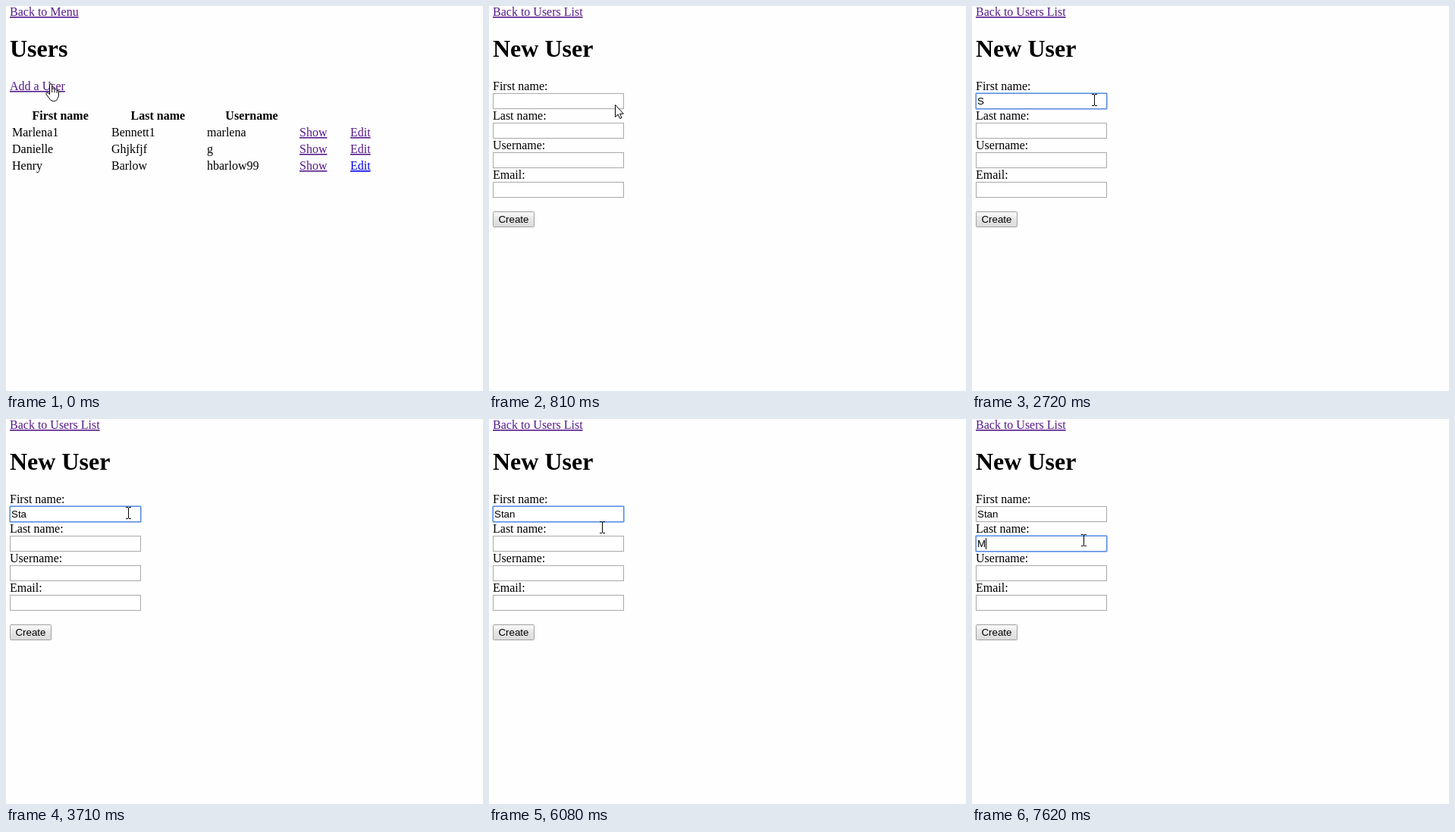
Animation, 629 px wide and 508 px high, one loop 8 s. Source, as an HTML page:

```html
<!DOCTYPE html>
<html lang="en">
<head>
<meta charset="utf-8">
<title>New User</title>
<style>
  html, body { margin: 0; width: 100%; height: 100%; overflow: hidden; background: #fefefe; }
  svg { display: block; width: 629px; height: 508px; }
  text { font: 16px "Liberation Serif", "Times New Roman", serif; white-space: pre; }
  .title { font-size: 32px; font-weight: bold; }
  .head text { font-weight: bold; text-anchor: middle; }
  .link { fill: #551a8b; text-decoration: underline; }
  .new { fill: #0000ee; }
  .ui { font: 13.333px "Liberation Sans", Arial, sans-serif; }
  .mid { text-anchor: middle; }
  .field { fill: #fff; stroke: #a9a9a9; }
  .glow { fill: none; stroke: #4d90fe; stroke-opacity: 0; }
  .focus .field { stroke: #5a8ad8; }
  .focus .glow { stroke-opacity: .55; }
  .outline { fill: #fff; stroke: #000; stroke-linejoin: round; }
  .fine { fill: none; stroke: #000; }
  [hidden] { display: none; }
</style>
</head>
<body>
<svg viewBox="0 0 629 508">
  <defs>
    <linearGradient id="face" x2="0" y2="1">
      <stop offset="0" stop-color="#f6f6f6"/>
      <stop offset=".3" stop-color="#f3f3f3"/>
      <stop offset=".3" stop-color="#ebebeb"/>
      <stop offset="1" stop-color="#dadada"/>
    </linearGradient>
  </defs>

  <g id="list">
    <text class="link" x="5" y="13">Back to Menu</text>
    <text class="title" x="5" y="67">Users</text>
    <text class="link" x="5" y="111">Add a User</text>
    <g class="head">
      <text x="71.7" y="150">First name</text>
      <text x="200.3" y="150">Last name</text>
      <text x="324" y="150">Username</text>
    </g>
    <g id="rows"></g>
  </g>

  <g id="form" hidden>
    <text class="link" x="5" y="13">Back to Users List</text>
    <text class="title" x="5" y="67">New User</text>
    <g id="fields"></g>
    <rect x="5.5" y="271.5" width="54" height="20" rx="1" fill="url(#face)" stroke="#a0a0a0"/>
    <text class="ui mid" x="32.5" y="286">Create</text>
    <rect id="caret" width="1" height="15"/>
  </g>

  <g id="cursor">
    <g id="hand">
      <path class="outline" d="M5.5 14.5V2.5Q5.5 .5 7 .5T8.7 2.5V7.7Q9.2 6.6 10.6 6.8 11.9 7 12 8.4 12.6 7.5 13.8 7.8 15 8.1 15.1 9.4 17.3 8.9 17.4 11.2V16Q17.4 18.4 15.6 20.6V21.5Q14 23.5 10.7 23.5 7.6 23.5 6.2 21.3L1.2 14.8Q.2 13 1.6 12.2 3 11.6 4.2 13Z"/>
      <path class="fine" d="M8.7 7.5V12M12 8.5V12.4M15.1 9.5V12.8"/>
    </g>
    <path id="arrow" class="outline" d="M.5 .5V16.4L4.2 13 6.6 18.5 9 17.5 6.7 12.2H11.4Z"/>
    <path id="beam" class="fine" d="M0 .5H3M4 .5H7M3.5 1V15M0 15.5H3M4 15.5H7"/>
  </g>
</svg>

<script>
const $ = id => document.getElementById(id);
const LOOP = 8000;

const users = [
  ["Marlena1", "Bennett1", "marlena"],
  ["Danielle", "Ghjkfjf", "g"],
  ["Henry", "Barlow", "hbarlow99"]
];
const columns = [8, 139, 265, 387, 454];

$("rows").innerHTML = users.map((user, row) =>
  [...user, "Show", "Edit"].map((label, col) => {
    const unseen = row === 2 && col === 4 ? " new" : "";
    const style = col > 2 ? ` class="link${unseen}"` : "";
    return `<text${style} x="${columns[col]}" y="${172 + 22 * row}">${label}</text>`;
  }).join("")
).join("");

$("fields").innerHTML = ["First name:", "Last name:", "Username:", "Email:"].map((label, i) => `
  <g transform="translate(0 ${39 * i})">
    <text x="5" y="111">${label}</text>
    <rect class="glow" x="4.5" y="114.5" width="174" height="22" rx="1.5"/>
    <rect class="field" x="5.5" y="115.5" width="172" height="20"/>
    <text class="ui value" x="7" y="130"></text>
  </g>`).join("");

const boxes = [...$("fields").children];
const values = boxes.map(box => box.querySelector(".value"));

// [start, shape, left, top]
const moves = [
  [0, "hand", 52, 102],
  [270, "beam", 63, 98],
  [420, "arrow", 120, 128],
  [540, "arrow", 204, 158],
  [660, "arrow", 202, 167],
  [810, "arrow", 166, 130],
  [930, "beam", 160, 119],
  [1060, "beam", 158, 116],
  [6080, "beam", 146, 135],
  [6230, "beam", 144, 148],
  [6380, "beam", 144, 152]
];

// [start, focused field, first name, last name, caret x (0 = hidden)]
const typing = [
  [0, -1, "", "", 0],
  [1210, 0, "", "", 7],
  [1770, 0, "", "", 0],
  [2190, 0, "S", "", 16],
  [2720, 0, "S", "", 0],
  [2870, 0, "St", "", 20],
  [3160, 0, "Sta", "", 27],
  [3710, 0, "Sta", "", 0],
  [4150, 0, "Sta", "", 27],
  [4700, 0, "Sta", "", 0],
  [5260, 0, "Stan", "", 34],
  [5790, 0, "Stan", "", 0],
  [6500, 1, "Stan", "", 7],
  [7040, 1, "Stan", "", 0],
  [7620, 1, "Stan", "M", 18]
];

const at = (steps, t) => steps.findLast(step => step[0] <= t);
const show = (node, on) => node.toggleAttribute("hidden", !on);

function draw(t) {
  show($("list"), t < 150);
  show($("form"), t >= 150);

  const [, shape, x, y] = at(moves, t);
  for (const node of $("cursor").children) show(node, node.id === shape);
  $("cursor").setAttribute("transform", `translate(${x} ${y})`);

  const [, focus, first, last, caret] = at(typing, t);
  boxes.forEach((box, i) => box.classList.toggle("focus", i === focus));
  values[0].textContent = first;
  values[1].textContent = last;
  show($("caret"), caret > 0);
  $("caret").setAttribute("x", caret);
  $("caret").setAttribute("y", 118 + 39 * Math.max(focus, 0));
}

const start = performance.now();
function tick() {
  draw((performance.now() - start) % LOOP);
  requestAnimationFrame(tick);
}
tick();
</script>
</body>
</html>
```
